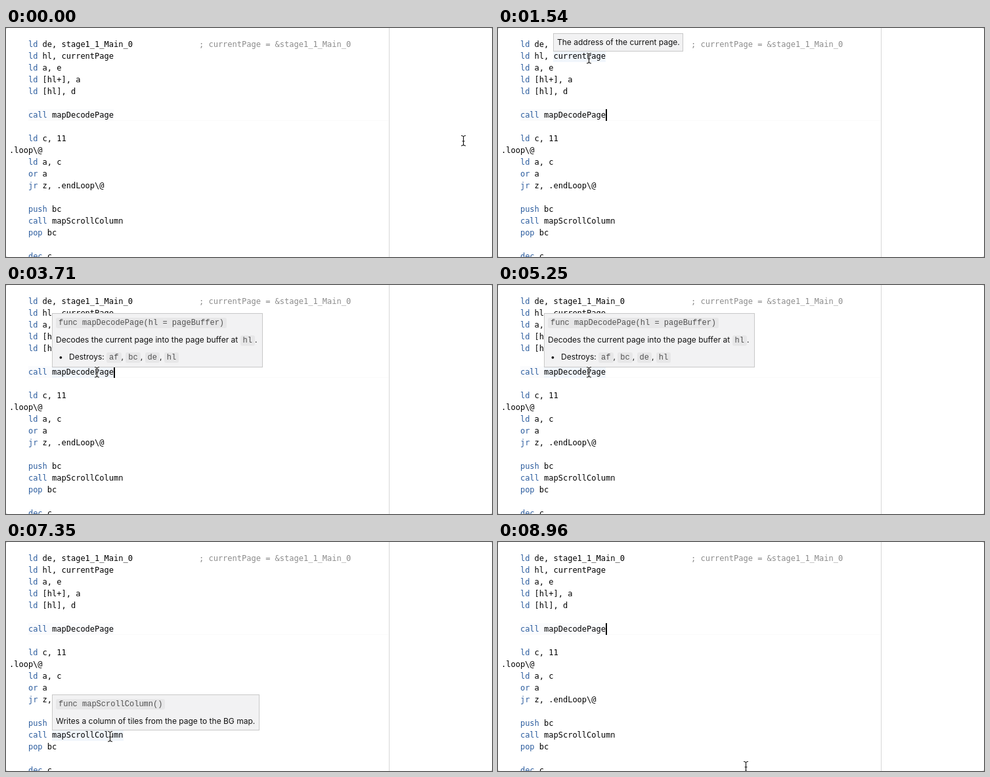
Animation, 740 px wide and 350 px high, one loop 9030 ms. Source, as an HTML page:

```html
<!DOCTYPE html>
<html lang="en">
<head>
<meta charset="utf-8">
<title>Assembly hover hints</title>
<style>
html, body { margin: 0; width: 100%; height: 100%; overflow: hidden; background: #ccc; }
#stage { position: relative; width: 740px; height: 350px; overflow: hidden; background: #fff; border-radius: 3px; }
#stage > * { position: absolute; }
pre { left: 5px; top: 16px; margin: 0; font: 12px/18px "DejaVu Sans Mono", monospace; color: #000; }
pre b { font-weight: normal; color: #2b5c9e; }
pre i { font-style: normal; color: #8c8c8c; }
#ruler { left: 583px; top: 0; width: 1px; height: 350px; background: #d6d6d6; }
#line { left: 34px; top: 141px; width: 548px; height: 1px; background: #fafafa; }
#call { left: 34px; top: 124px; width: 130px; height: 17px; background: #fafbfd; }
#caret { left: 164px; top: 124px; width: 2px; height: 18px; background: #000; }
.word { height: 18px; background: #f1f6fc; }
.tip {
  box-sizing: border-box; padding: 0 5px; border: 1px solid #c8c8c8; background: #f2f2f3;
  font: 12px/26.7px Inter, sans-serif; color: #111; white-space: nowrap;
}
.tip code {
  padding: 1px 4px; border-radius: 3px; background: #e7e7e8; color: #505050;
  font: 12px/1 "Liberation Mono", monospace;
}
.tip u { display: inline-block; width: 16px; margin-left: 4px; text-decoration: none; }
#mouse { left: 0; top: 0; overflow: visible; fill: none; }
</style>
</head>
<body>
<div id="stage">
  <div id="ruler"></div>
  <div id="line"></div>
  <div id="call"></div>
  <div class="word" style="left:84px;top:34px;width:80px"></div>
  <div class="word" style="left:70px;top:124px;width:94px"></div>
  <div class="word" style="left:70px;top:286px;width:109px"></div>
  <pre id="code"></pre>
  <div id="caret"></div>
  <div class="tip" style="left:84px;top:8px;width:198px;height:28px;line-height:26px">The address of the current page.</div>
  <div class="tip" style="left:70px;top:43px;width:321px;height:83px">
    <div><code>func mapDecodePage(hl = pageBuffer)</code></div>
    <div>Decodes the current page into the page buffer at <code>hl</code>.</div>
    <div><u>•</u>Destroys: <code>af</code>, <code>bc</code>, <code>de</code>, <code>hl</code></div>
  </div>
  <div class="tip" style="left:70px;top:233px;width:316px;height:55px">
    <div><code>func mapScrollColumn()</code></div>
    <div>Writes a column of tiles from the page to the BG map.</div>
  </div>
  <svg id="mouse" width="1" height="1">
    <g id="beam">
      <path id="shape" d="M-3.5-7.5Q0-7.5 0-5V5.500Q0 8-3.5 8M3.500-7.5Q0-7.5 0-5M0 5.500Q0 8 3.500 8M-2 1H2" stroke="#fff" stroke-width="2.500"/>
      <use href="#shape" style="display:none"/>
    </g>
  </svg>
</div>
<script>
const source = String.raw`    ld de, stage1_1_Main_0              ; currentPage = &stage1_1_Main_0
    ld hl, currentPage
    ld a, e
    ld [hl+], a
    ld [hl], d

    call mapDecodePage

    ld c, 11
.loop\@
    ld a, c
    or a
    jr z, .endLoop\@

    push bc
    call mapScrollColumn
    pop bc

    dec c`;
const $ = id => document.getElementById(id);
$("code").innerHTML = source
  .replace(/&/g, "&amp;")
  .replace(/^( {4})(\w+)/gm, "$1<b>$2</b>")
  .replace(/;\s.*$/m, "<i>$&</i>");

// white halo below, black beam on top
const ink = $("shape").cloneNode();
ink.removeAttribute("id");
ink.setAttribute("stroke", "#111");
ink.setAttribute("stroke-width", 1.1);
$("beam").append(ink);

const LOOP = 9030, STEP = 70, BLINK = 503;
const moves = [ // start, end, x, y
  [70, 910, 138.5, 46],
  [2590, 2940, 138.5, 133],
  [5460, 6200, 158.5, 297],
  [8260, 8960, 377.5, 343],
];
const hovers = [[1370, 2700], [3310, 5600], [6600, 8400]];
const tips = document.querySelectorAll(".tip");
const words = document.querySelectorAll(".word");
const clamp = v => Math.min(1, Math.max(0, v));
const ease = v => v * v * (3 - 2 * v);

function draw(t) {
  let x = 696.5, y = 172;
  for (const [from, to, nx, ny] of moves) {
    const k = ease(clamp((t - from) / (to - from)));
    x += (nx - x) * k;
    y += (ny - y) * k;
  }
  $("beam").setAttribute("transform", `translate(${Math.round(x - .5) + .5} ${Math.round(y)})`);
  hovers.forEach(([from, to], i) => {
    const shown = t < to ? clamp((t - from) / 100) : 0;
    tips[i].style.opacity = shown;
    words[i].style.opacity = shown > 0 ? 1 : 0;
  });
  const lit = Math.floor((t - 2450) / BLINK) % 2 === 0;
  $("caret").style.opacity = lit ? 1 : 0;
}

function frame(now) {
  draw(Math.floor(now % LOOP / STEP) * STEP);
  requestAnimationFrame(frame);
}
draw(0);
requestAnimationFrame(frame);
</script>
</body>
</html>
```
